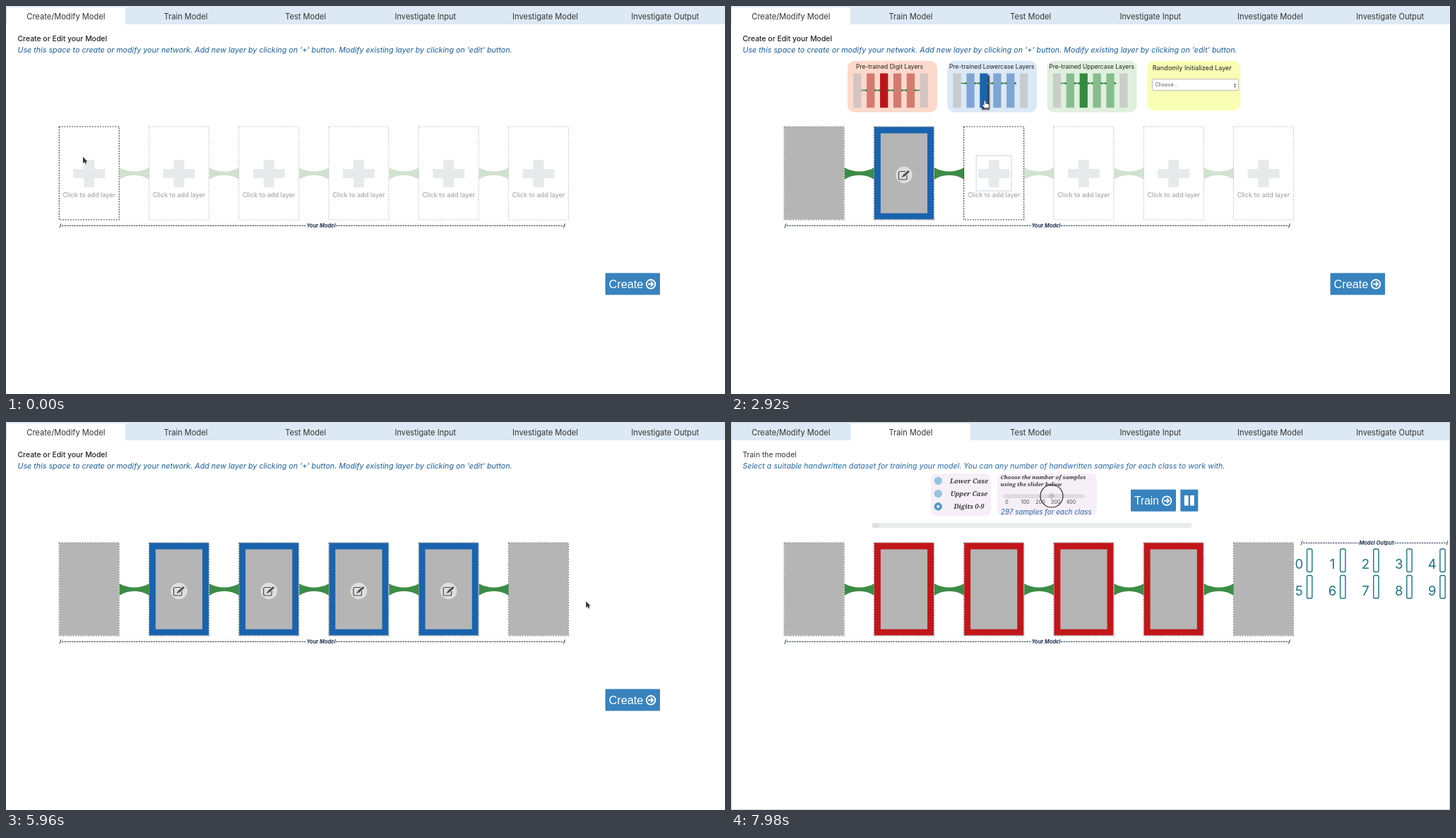
Recreate the animation shown at these times as an HTML page with a canvas. Size 1018 by 550 pixels, loop 8000 ms.

```html
<!DOCTYPE html>
<html lang="en">
<head>
<meta charset="utf-8">
<title>Model builder</title>
<style>
  html, body { margin: 0; width: 100%; height: 100%; overflow: hidden; background: #fff; }
  canvas { display: block; width: 1018px; height: 550px; }
</style>
</head>
<body>
<canvas id="stage" width="1018" height="550"></canvas>
<script>
const ctx = document.getElementById('stage').getContext('2d');
const LOOP = 8000, TRAIN_PAGE = 6420, MENU_OPEN = 5020, DRAG_START = 7300;
const SANS = 'Inter, sans-serif', SERIF = '"Noto Serif", serif', ARIAL = '"Liberation Sans", sans-serif';
const GREY = '#b5b5b5', BLUE = '#1a63ae', RED = '#c1161a', GREEN = '#3d8c46', BUTTON = '#3883be', TEAL = '#1b747f';

// When each slot's chooser opens and when the slot is filled.
const opens = [0, 840, 2450, 3510, 4050, 4870];
const fills = [300, 1640, 3200, 3780, 4480, 5360];
const clicks = [230, 730, 1560, 2340, 3120, 3400, 3700, 3940, 4400, 4760, 4960, 5290, 6190, 6820];
const path = [
  [0, 109, 214], [180, 122, 238], [320, 122, 238], [700, 244, 240], [820, 244, 240],
  [980, 218, 155], [1400, 338, 118], [1660, 338, 118], [2120, 372, 240], [2440, 372, 240],
  [2900, 359.5, 134], [3180, 359.5, 134], [3400, 499, 240], [3490, 499, 240], [3690, 378, 122],
  [3760, 378, 122], [3930, 635.5, 245], [4060, 635.5, 245], [4390, 397, 120], [4480, 397, 120],
  [4750, 754, 240], [4850, 754, 240], [4960, 766, 150], [5040, 766, 150], [5180, 784, 165],
  [5380, 784, 165], [5680, 800, 210], [5860, 800, 210], [6180, 890, 398], [6420, 890, 398],
  [6640, 291, 82], [6700, 291, 82], [6810, 292, 118], [6950, 292, 118], [7240, 388, 105],
  [7320, 388, 105], [7960, 454, 105], [8000, 454, 105]
];
const panels = [
  { x: 165, title: 'Pre-trained Digit Layers', back: '#fdd9cb', soft: '#d47b71', strong: '#bb1519', linkY: 119.5 },
  { x: 306.3, title: 'Pre-trained Lowercase Layers', back: '#dbe8f5', soft: '#7fa5d4', strong: BLUE, linkY: 109.5 },
  { x: 447.6, title: 'Pre-trained Uppercase Layers', back: '#e0f0de', soft: '#87bd8e', strong: '#338a41', linkY: 109.5 }
];

function cursorAt(t) {
  const i = Math.max(1, path.findIndex(p => p[0] > t));
  const [t0, x0, y0] = path[i - 1], [t1, x1, y1] = path[i];
  const u = (t - t0) / (t1 - t0), e = u * u * (3 - 2 * u);
  return { x: x0 + (x1 - x0) * e, y: y0 + (y1 - y0) * e };
}

const inside = (p, x, y, w, h) => p.x >= x && p.x <= x + w && p.y >= y && p.y <= y + h;

function rect(x, y, w, h, fill, radius = 0, stroke, width = 1) {
  ctx.beginPath();
  ctx.roundRect(x, y, w, h, radius);
  if (fill) { ctx.fillStyle = fill; ctx.fill(); }
  if (stroke) { ctx.strokeStyle = stroke; ctx.lineWidth = width; ctx.stroke(); }
}

function circle(x, y, r, fill, stroke, width = 1) {
  ctx.beginPath();
  ctx.arc(x, y, r, 0, Math.PI * 2);
  if (fill) { ctx.fillStyle = fill; ctx.fill(); }
  if (stroke) { ctx.strokeStyle = stroke; ctx.lineWidth = width; ctx.stroke(); }
}

function line(points, color, width, dash = []) {
  ctx.beginPath();
  points.forEach(([x, y]) => ctx.lineTo(x, y));
  ctx.strokeStyle = color;
  ctx.lineWidth = width;
  ctx.setLineDash(dash);
  ctx.stroke();
  ctx.setLineDash([]);
}

function text(str, x, y, size, color, { style = '', family = SANS, align = 'left' } = {}) {
  ctx.font = `${style} ${size}px ${family}`;
  ctx.fillStyle = color;
  ctx.textAlign = align;
  ctx.fillText(str, x, y);
}

function shadowed(color, blur, dx, dy, draw) {
  ctx.save();
  ctx.shadowColor = color;
  ctx.shadowBlur = blur;
  ctx.shadowOffsetX = dx;
  ctx.shadowOffsetY = dy;
  draw();
  ctx.restore();
}

function drawTabs(active) {
  rect(0, 1, 1018, 25, '#dce9f5');
  rect(0, 0, 1018, 1, '#e4e7ea');
  const w = 1018 / 6;
  rect(active * w, 2, w - 0.7, 25, '#fff');
  if (!active) line([[0.5, 2], [0.5, 26]], '#ddd', 1);
  ['Create/Modify Model', 'Train Model', 'Test Model', 'Investigate Input', 'Investigate Model', 'Investigate Output']
    .forEach((name, i) => text(name, (i + 0.5) * w, 18.5, 11.1, '#333', { align: 'center' }));
}

function drawRuler(label, left, right, labelX, y) {
  const half = label.length * 2.1, color = '#24384f';
  line([[left, y + 3], [left + 2, y - 3]], color, 1);
  line([[right - 2, y + 3], [right, y - 3]], color, 1);
  line([[left + 3, y], [labelX - half, y]], color, 1.1, [2.4, 1.1]);
  line([[labelX + half, y], [right - 2, y]], color, 1.1, [2.4, 1.1]);
  text(label, labelX, y + 2.5, 7.4, color, { style: 'italic 700', align: 'center' });
}

function drawConnector(x, color) {
  ctx.beginPath();
  ctx.moveTo(x, 229);
  ctx.bezierCurveTo(x + 12, 236.3, x + 30, 236.3, x + 42, 229);
  ctx.lineTo(x + 42, 246);
  ctx.bezierCurveTo(x + 30, 237.7, x + 12, 237.7, x, 246);
  ctx.fillStyle = color;
  ctx.fill();
}

function drawEditIcon(x, y) {
  const paper = '#dedede', ink = '#4a4a4a';
  circle(x, y, 11.8, paper);
  rect(x - 7.5, y - 5, 11.5, 11.5, null, 2, ink, 1.2);
  line([[x - 2.5, y + 2.5], [x + 7.5, y - 6]], paper, 4.8);
  line([[x - 1, y + 1.6], [x + 7, y - 5.5]], ink, 2.8);
  line([[x - 3, y + 3.2], [x - 1, y + 1.6]], ink, 1.3);
}

const slotX = i => 75.2 + i * 127.25;

function drawSlot(i, t, training) {
  const x = slotX(i), y = 171, w = 85, h = 132, mid = x + w / 2;
  const filled = t >= fills[i], open = t >= opens[i] && !filled;
  const hidden = i > 0 && i < 5;
  if (filled) {
    rect(x + 0.5, y + 0.3, w - 1, h - 0.8, hidden ? (training ? RED : BLUE) : GREY);
    if (hidden) {
      rect(x + 9.4, y + 9.5, w - 18.8, h - 18.8, GREY);
      if (!training) drawEditIcon(mid, 239.5);
    }
  } else {
    rect(mid - 22.5, 231, 45, 13, '#e6eaeb', 1.5);
    rect(mid - 7.5, 218, 15, 39, '#e6eaeb', 1.5);
    if (i > 0 && t >= opens[i] - 110) rect(mid - 25, 212, 50, 50, null, 0, '#dfe2f0', 1.5);
    text('Click to add layer', mid, 271, 9.15, '#9a9a9a', { align: 'center' });
  }
  ctx.setLineDash([1.8, 1.8]);
  rect(x, y, w, h, null, 0, open ? '#222' : filled ? '#777' : '#c4c4c4', 1.1);
  ctx.setLineDash([]);
  if (i < 5) drawConnector(x + w + 0.5, filled ? GREEN : '#d0e2d0');
}

function drawSelect(x, y, w, h) {
  rect(x, y, w, h, '#fff', 2, '#b9bcb5', 1);
  text('Choose...', x + 4, y + h / 2 + 2.6, 7.2, '#555');
  text('▴', x + w - 5, y + h / 2, 5, '#333', { align: 'center', family: '"DejaVu Sans", sans-serif' });
  text('▾', x + w - 5, y + h / 2 + 4, 5, '#333', { align: 'center', family: '"DejaVu Sans", sans-serif' });
}

const barX = (panel, i) => panel.x + 8.2 + i * 18.9;

function drawPalette(layer, cursor) {
  for (const p of panels) {
    rect(p.x, 77.7, 127, 73, p.back, 10);
    text(p.title, p.x + (p.x < 200 ? 59.5 : 63), 89, 8.5, '#222', { align: 'center' });
    line([[barX(p, 1) - 8, p.linkY], [barX(p, 5) - (p.x < 200 ? 0 : 5), p.linkY]], GREEN, 1.6);
    for (let i = 0; i < 6; i++) {
      const x = barX(p, i), end = i === 0 || i === 5;
      const color = end ? 'rgba(190,190,190,.65)' : i === layer ? p.strong : p.soft;
      const bar = () => rect(x, 95.5, 11.3, 48.7, color);
      if (!end && inside(cursor, x, 95, 12, 49)) shadowed('#333', 2, 2.5, 2.5, bar);
      else bar();
      if (i > 0 && !end) {
        circle(x - 1, p.linkY, 1.6, GREEN);
        circle(x + 12.3, p.linkY, 1.6, GREEN);
      }
    }
  }
  rect(589, 77.7, 132.3, 70.5, '#f8ffb4', 10);
  text('Randomly Initialized Layer', 652.8, 91.2, 9.1, '#222', { align: 'center' });
  drawSelect(596.5, 103.7, 122, 16);
}

function drawClassChooser(t, cursor) {
  text('Final Classification', 728, 127.5, 7.2, '#333');
  text('Layer', 728, 138, 7.2, '#333');
  if (t < MENU_OPEN) return drawSelect(728, 144, 78, 14);
  shadowed('rgba(0,0,0,.35)', 9, 0, 2, () => rect(721, 142.5, 116, 49, '#ededed', 4));
  ['Choose...', '10 - Digit Classes', '26 - Lowercase Alphabet', '26 - Uppercase Alphabet'].forEach((name, i) => {
    const y = 151.3 + i * 10.6, hot = cursor.y > 158 && i === 1;
    if (hot) rect(721, y - 5.2, 116, 10.8, '#3c7df0');
    text(name, 736, y + 2.7, 7.2, hot ? '#fff' : '#444', { style: hot ? '600' : '' });
  });
  line([[725.5, 152], [727.5, 154.5], [731, 149]], '#333', 1.1);
}

function drawArrowButton(x, y, w, label, size) {
  rect(x, y, w, 31, BUTTON, 1);
  text(label, x + 5, y + 21.5, size, '#fff', { family: ARIAL });
  const cx = x + w - 13, cy = y + 15.8;
  circle(cx, cy, 6.3, null, '#fff', 1.8);
  line([[cx - 4, cy], [cx + 3, cy]], '#fff', 1.9);
  line([[cx, cy - 3.3], [cx + 3.3, cy], [cx, cy + 3.3]], '#fff', 1.8);
}

function drawCreatePage(t, cursor) {
  drawTabs(0);
  text('Create or Edit your Model', 16.5, 49.5, 10.4, '#222', { style: '500' });
  text("Use this space to create or modify your network. Add new layer by clicking on '+' button. " +
    "Modify existing layer by clicking on 'edit' button.", 16.5, 66, 10.73, '#1b5c96', { style: 'italic' });
  for (let i = 0; i < 6; i++) drawSlot(i, t, false);
  drawRuler('Your Model', 76, 791.5, 446, 311.5);
  const open = opens.findIndex((start, i) => t >= start && t < fills[i]);
  if (open > 0 && open < 5) drawPalette(open, cursor);
  if (open === 5) drawClassChooser(t, cursor);
  drawArrowButton(848.5, 378.5, 77.5, 'Create', 16.3);
}

function drawSamples(t, cursor) {
  const serif = { style: 'italic 700', family: SERIF };
  rect(377, 73, 141, 60, '#f7eff8', 8);
  text('Choose the number of samples', 381.5, 80.5, 7.8, '#3a3a3a', serif);
  text('using the slider below', 381.5, 91, 7.8, '#3a3a3a', serif);
  rect(386, 102.8, 114, 4.8, '#dedede', 2.4, '#cfcfcf', 0.6);
  const x = t < DRAG_START ? 388 : cursor.x, count = Math.round((x - 388) * 4.5);
  circle(x, 105.2, 2.8, '#fff', '#aaa', 0.8);
  [390.5, 416.5, 438, 459.5, 481.5].forEach((labelX, i) =>
    text(i * 100, labelX, 116, 7.1, '#444', { align: 'center' }));
  if (count > 0) text(`${count} samples for each class`, 382, 131, 9.9, '#2468a6', { style: 'italic' });
}

function drawTrainPage(t, cursor) {
  drawTabs(1);
  text('Train the model', 16.5, 49.5, 10.4, '#333');
  text('Select a suitable handwritten dataset for training your model. You can any number of ' +
    'handwritten samples for each class to work with.', 16.5, 66, 10.7, '#2468a6', { style: 'italic' });

  rect(283, 73, 85, 60, '#f7eff8', 8);
  ['Lower Case', 'Upper Case', 'Digits 0-9'].forEach((name, i) => {
    const y = 83.3 + i * 18.2, chosen = i === 2 && t > 6860;
    const hot = inside(cursor, 286, y - 6, 14, 12);
    circle(293.3, y, 5.6, chosen ? '#4f9ac5' : hot ? '#7d7d7d' : '#93c3dd');
    if (chosen) circle(293.3, y, 2, '#fff');
    text(name, 337, y + 3.5, 9.2, '#3a3a3a', { style: 'italic 700', family: SERIF, align: 'center' });
  });
  drawSamples(t, cursor);

  drawArrowButton(566, 95.8, 64, 'Train', 15.6);
  rect(636.3, 95.8, 25, 31, BUTTON, 1);
  rect(641.8, 104, 5.8, 14.5, '#fff');
  rect(650, 104, 5.8, 14.5, '#fff');
  rect(200, 143, 452.5, 7, '#e7edec', 2);
  rect(200, 143, 10, 7, '#dde3e2', 2);

  for (let i = 0; i < 6; i++) drawSlot(i, t, true);
  drawRuler('Your Model', 76, 791.5, 446, 311.5);
  drawRuler('Model Output', 807, 1015, 914, 171.5);
  for (let d = 0; d < 10; d++) {
    const x = 804.3 + (d % 5) * 47.1, y = 180 + Math.floor(d / 5) * 37.5;
    text(d, x, y + 28, 18.5, TEAL, { align: 'center' });
    rect(x + 11.2, y, 7.3, 32.5, '#fff', 2, TEAL, 1.4);
  }
  rect(0.5, 0.5, 1017, 549, null, 0, '#d2d2d2', 1);
}

function isClickable(p, t) {
  if (t >= TRAIN_PAGE) return inside(p, 286, 77, 15, 50);
  const overPlus = fills.some((fill, i) => t < fill && inside(p, slotX(i) + 20, 217, 45, 40));
  const overBar = opens.some((start, i) => i > 0 && i < 5 && t >= start && t < fills[i] &&
    panels.some(panel => inside(p, barX(panel, i), 95, 12, 49)));
  return overPlus || overBar || inside(p, 848, 378, 78, 31);
}

const arrowShape = new Path2D('M0 0V10.2L2.4 8L4 11.6L5.7 10.9L4.2 7.4H7.4Z');
const handShape = new Path2D('M-1 1Q0-.5 1 1V5L5.5 6Q7 6.5 6.6 8.5L5.6 12H-.6L-3.6 8Q-3.8 6.3-2 7L-1 8Z');

function drawCursor(p, t) {
  const dragging = t >= DRAG_START;
  if (dragging) {
    line([[p.x - 4, p.y], [p.x + 4, p.y]], '#666', 1, [1.5, 1]);
    line([[p.x, p.y - 4], [p.x, p.y + 4]], '#666', 1, [1.5, 1]);
  } else {
    const hand = isClickable(p, t), shape = hand ? handShape : arrowShape;
    ctx.save();
    ctx.translate(p.x, p.y);
    ctx.scale(0.87, 0.87);
    ctx.lineWidth = 1.5;
    ctx.strokeStyle = hand ? '#333' : '#eee';
    ctx.fillStyle = hand ? '#fff' : '#333';
    ctx.stroke(shape);
    ctx.fill(shape);
    ctx.restore();
  }
  const click = clicks.find(c => t >= c && t < c + 100);
  if (dragging) circle(p.x, p.y, 16, null, '#333', 1.2);
  else if (click !== undefined) circle(p.x, p.y, 16 + 0.1 * (t - click), null, '#222', 1.2);
}

const started = performance.now();

function frame() {
  const t = (performance.now() - started) % LOOP, cursor = cursorAt(t);
  rect(0, 0, 1018, 550, '#fff');
  (t < TRAIN_PAGE ? drawCreatePage : drawTrainPage)(t, cursor);
  drawCursor(cursor, t);
  requestAnimationFrame(frame);
}
frame();
</script>
</body>
</html>
```
